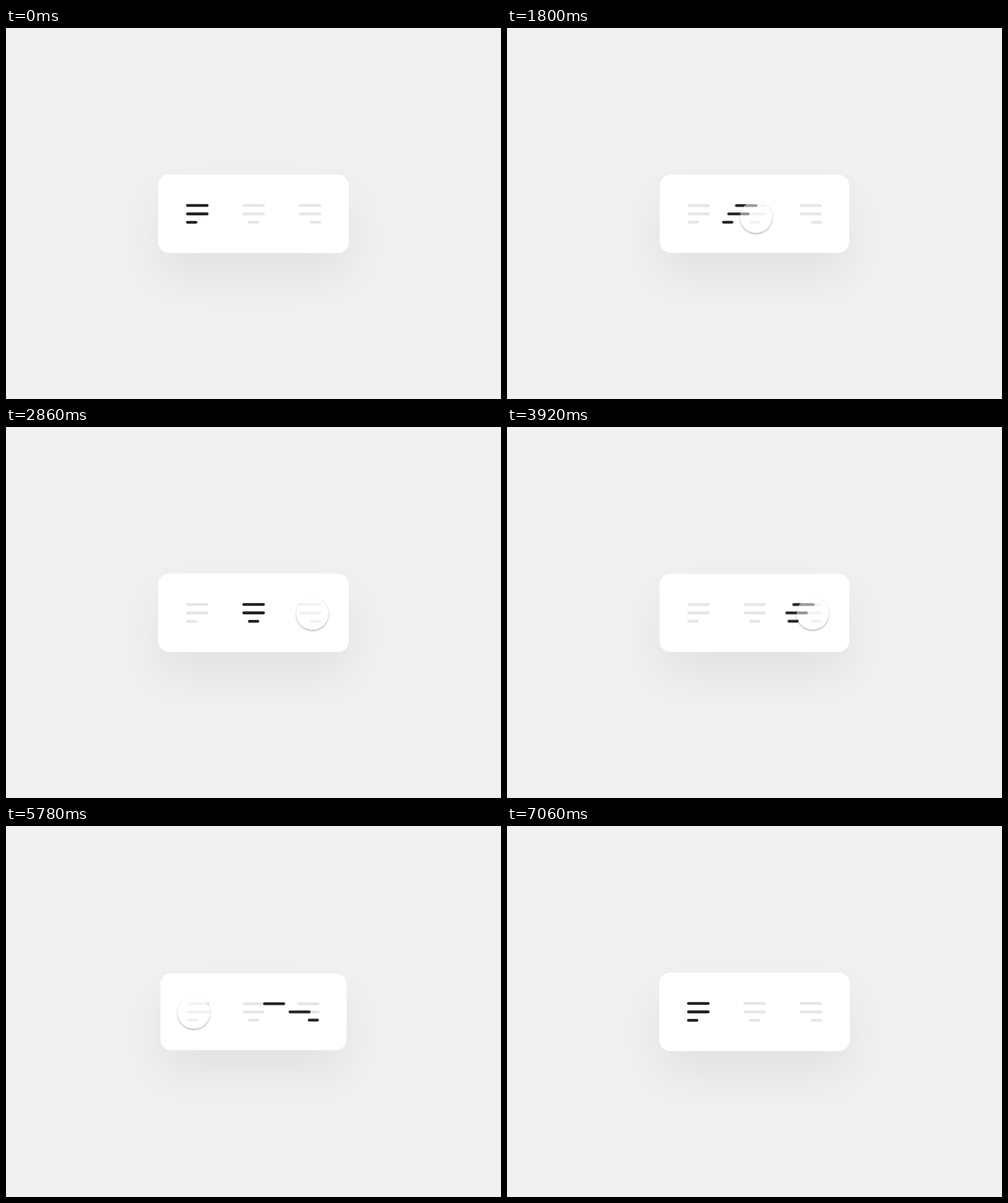
These frames come from a looping animation (800 by 600 pixels, 7.56 s). An HTML page:

```html
<!DOCTYPE html>
<html lang="en">
<head>
<meta charset="utf-8">
<title>Text alignment switch</title>
<style>
  :root {
    --loop: 7.56s;
    --glide: cubic-bezier(.4, 0, .2, 1);
    --soft: cubic-bezier(.33, 0, .67, 1);
  }
  html, body {
    margin: 0;
    width: 100%;
    height: 100%;
    overflow: hidden;
    background: #f0f0f0;
  }
  .stage {
    position: relative;
    width: 800px;
    height: 600px;
    overflow: hidden;
  }

  .card {
    position: absolute;
    left: 246px;
    top: 237px;
    width: 308px;
    height: 127px;
    border-radius: 18px;
    background: #fff;
    box-shadow: 0 36px 72px rgba(0, 0, 0, .06);
    animation: card var(--loop) var(--soft) infinite;
  }
  .card svg {
    display: block;
    fill: none;
    stroke-width: 4.6;
    stroke-linecap: round;
  }
  .idle { stroke: #e6e6e6; }
  .active { stroke: #222; }
  .long { animation: long var(--loop) var(--glide) infinite; }
  .late { animation-delay: 88ms; }
  .short { animation: short var(--loop) var(--glide) infinite; }

  .cursor {
    position: absolute;
    left: -26px;
    top: -26px;
    width: 52px;
    height: 52px;
    border-radius: 50%;
    background: linear-gradient(rgba(255, 255, 255, .58), rgba(255, 255, 255, .42));
    box-shadow: 0 1.5px 3px rgba(0, 0, 0, .35);
    animation:
      travel var(--loop) var(--glide) infinite,
      arc var(--loop) infinite,
      press var(--loop) var(--soft) infinite,
      show var(--loop) step-end infinite;
  }

  /* Active bars: left, centre, right, back to left */
  @keyframes long {
    0%, 18.095% { translate: 0; }
    28.148%, 45.873% { translate: 91px; }
    55.926%, 73.651% { translate: 182px; }
    83.704%, 100% { translate: 0; }
  }
  @keyframes short {
    0%, 20.423% { translate: 0; }
    29.458%, 48.201% { translate: 100.1px; }
    57.235%, 75.979% { translate: 200.2px; }
    85.013%, 100% { translate: 0; }
  }

  @keyframes card {
    0%, 18.122%, 25.397%, 45.9%, 53.175%, 73.677%, 80.952%, 100% { scale: 1; }
    20.635%, 48.413%, 76.19% { scale: .9765; }
  }

  @keyframes travel {
    0%, .265% {
      translate: 611px 460px;
      animation-timing-function: cubic-bezier(.167, .383, .267, 1);
    }
    11.243%, 24.603% { translate: 402.5px 305.5px; }
    38.757%, 51.058% { translate: 495.5px 302px; }
    65.542%, 87.897% { translate: 303.5px 302px; }
    87.897% { animation-timing-function: cubic-bezier(.575, 0, .693, .515); }
    93.386%, 100% { translate: 68.5px 640px; }
  }
  @keyframes arc {
    0%, 51.058% {
      transform: translateY(0);
      animation-timing-function: cubic-bezier(.5, 0, .6, 1);
    }
    56.124% {
      transform: translateY(-9px);
      animation-timing-function: cubic-bezier(.24, 0, .33, 1);
    }
    65.542%, 100% { transform: translateY(0); }
  }
  @keyframes press {
    0%, 11.111%, 20.37%, 41.005%, 48.148%, 69.841%, 75.926%, 100% { scale: 1; }
    16.534%, 44.312%, 72.09% { scale: .93; }
  }
  @keyframes show {
    0% { opacity: 0; }
    .264% { opacity: 1; }
    93.386%, 100% { opacity: 0; }
  }
</style>
</head>
<body>
<div class="stage">
  <div class="card">
    <svg width="308" height="127" viewBox="0 0 308 127">
      <g class="idle">
        <path d="M47.3 50h31.8M47.3 63.6h31.8M47.3 77.2h13.6"/>
        <path d="M138.3 50h31.8M138.3 63.6h31.8M147.4 77.2h13.6"/>
        <path d="M229.3 50h31.8M229.3 63.6h31.8M247.5 77.2h13.6"/>
      </g>
      <g class="active">
        <path class="long" d="M47.3 50h31.8"/>
        <path class="long late" d="M47.3 63.6h31.8"/>
        <path class="short" d="M47.3 77.2h13.6"/>
      </g>
    </svg>
  </div>
  <div class="cursor"></div>
</div>
</body>
</html>
```
